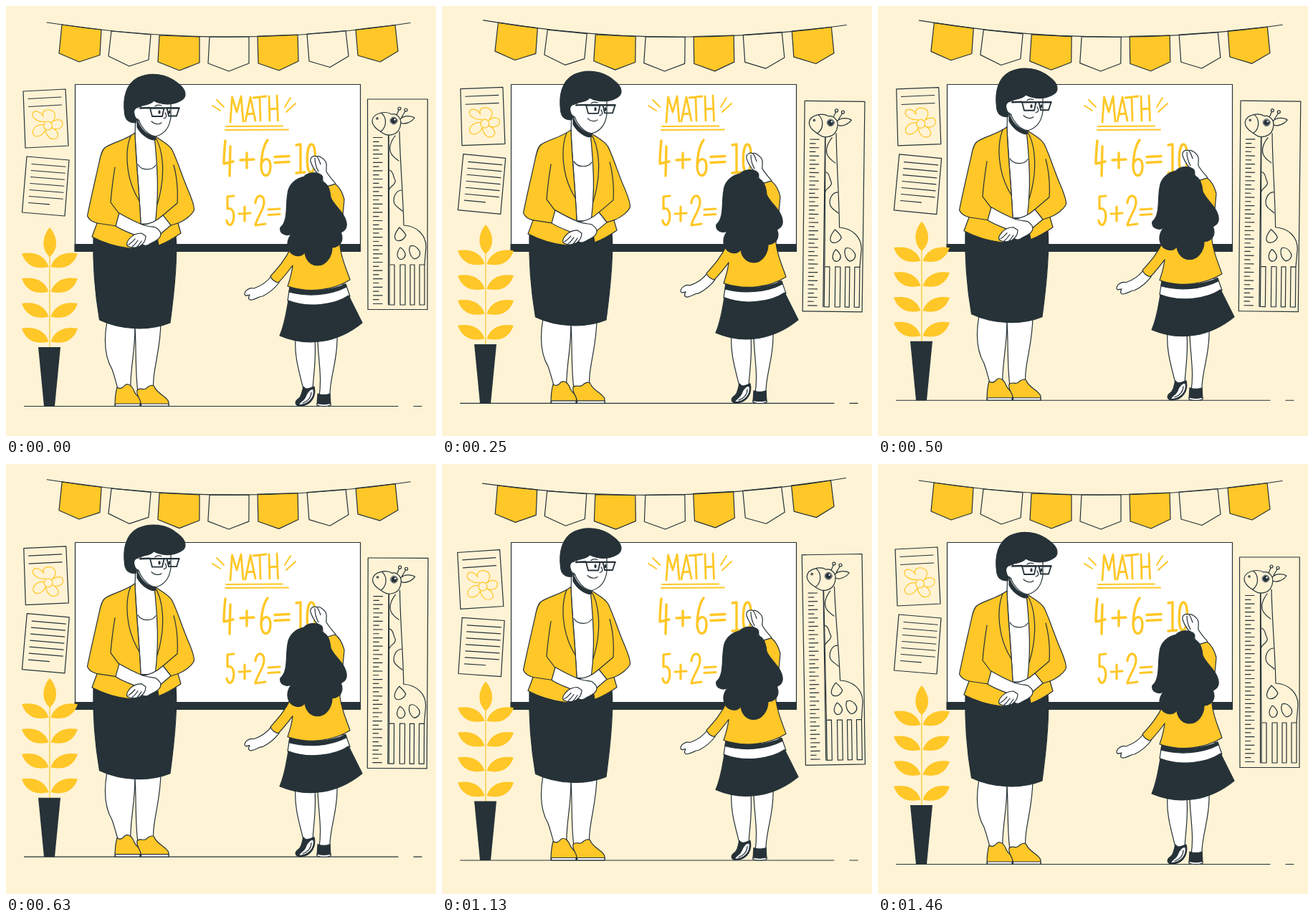
An HTML page that plays this animation: 600 px wide and 600 px high, repeating every 1500 ms.

```html
<!DOCTYPE html>
<html lang="en">
<head>
<meta charset="utf-8">
<title>Math lesson</title>
<style>
html, body { margin: 0; width: 100%; height: 100%; overflow: hidden; background: #fff3d5; }
svg { display: block; width: 100vw; height: 100vh; }
.ink { fill: none; stroke: #263238; stroke-width: 1.2; stroke-linecap: round; stroke-linejoin: round; }
.w { fill: #fff; }
.y { fill: #ffc727; }
.d { fill: #263238; }
.chalk { fill: none; stroke: #ffc727; stroke-linecap: round; stroke-linejoin: round; }
</style>
</head>
<body>
<svg viewBox="0 0 600 600">
  <g class="ink">
    <rect class="w" x="96.5" y="109.5" width="398" height="223"/>
    <rect class="d" x="96" y="332.6" width="398.5" height="9.8"/>
  </g>

  <g class="chalk" role="img" aria-label="MATH 4+6=10 5+2=">
    <path stroke-width="2.8" d="M313 162L315.5 127L322 148L328 126L331 161M334 161L341 127L348 160M336.5 151L346 150M345 128L363 126M354 128L355 160M367 126L368 160M378 125L379.5 160M368 144L378 143"/>
    <path stroke-width="2" d="M294 131L304 141M288 139L299 146M397 128L389 141M404 136L391 148M307 168L386 167.5M306 173L394 172.5"/>
    <path stroke-width="3.4" d="M306 188C305 198 304 210 304 220L317 217M313 196L312 237M327 215L346 214M336 205L336 226M365 187C358 196 356 214 356 225C357 241 369 240 369 224C369 210 358 211 356 222M375 210.5L395 209.5M375 218.5L395 217.5M405 194L411 193L411 232M405 233L417 232M426 193C419 194 418 231 425 232C433 233 434 192 426 193"/>
    <path stroke-width="3.2" d="M318 265L309 266L309 283C320 280 319 298 315 304C312 308 308 303 308 299M325 290L341 289M333 280L333 300M348 275C349 261 361 262 360 275C359 286 350 295 348 306L362 304M366 284L382 283M366 291.5L382 290.5"/>
  </g>

  <g id="bunting" class="ink"></g>

  <g id="wall" class="ink">
    <path d="M24 119L83 116L87 195L27 198ZM31 129.5L77 127M31.5 140.5L77.5 138"/>
    <path class="chalk" d="M54 161C47 163 35 157 37 150C40 144 49 148 52 154C49 146 57 143 64 146C71 149 69 158 63 163C70 157 80 157 79 165C78 172 69 173 64 170C72 173 76 182 69 185C61 188 56 180 55 173C51 181 42 185 38 179C35 172 44 164 53 166"/>
    <circle class="chalk" cx="58.5" cy="167" r="6"/>
    <path d="M29 210L88 215L82 293L22.5 288Z"/>
    <path id="notes"/>
    <path d="M504.5 130H588.3L588 423.5H505ZM533.5 181V417"/>
    <path id="ticks"/>
    <path d="M538 151C530 146 512 149 511 160C511 169 521 174 527 178C533 182 544 180 548 173C551 168 552 160 549 156C546 152 542 150 538 151M524 149.5C531 155 532 168 523 175M550 158C555 152 566 153 570 156C566 162 556 166 551 163M545 152L548 145M552 155L557 147"/>
    <circle cx="549" cy="143" r="2"/><circle cx="558" cy="145" r="2"/>
    <circle cx="518" cy="157" r="1.2"/>
    <circle class="w" cx="541" cy="160" r="5" stroke-width=".8"/>
    <circle class="d" cx="541" cy="160" r="3.6"/>
    <circle cx="542.5" cy="158.5" r="1.2" fill="#fff" stroke="none"/>
    <path d="M534 180L535 360M549 175C550 220 554 262 555 306C573 307 586 319 586 336L584 361"/>
    <path d="M543 181C537 189 534 198 537 205C540 211 544 213 548 216M535 229C541 230 540 239 543 243C545 249 535 252 535 256M552 257C544 257 539 268 542 276C545 281 550 283 553 286"/>
    <path d="M549 309C543 316 540 324 545 327C551 329 556 325 558 320C556 315 552 312 549 309ZM564 335C561 341 564 350 570 353C576 352 579 347 577 342C574 337 569 333 564 335ZM550 337C546 342 544 349 549 353C554 355 558 350 557 345C555 341 553 338 550 337Z"/>
    <path d="M535 417V361H542V417ZM550 417V361H557V417ZM564 417V361H570V417ZM577 417V361H584V417Z"/>
  </g>

  <g id="people" class="ink">
    <path d="M25.5 558.5H547M569 558.5H580"/>

    <g class="y" stroke="none">
      <path d="M61 309C50 322 49 340 61 350C73 340 73 323 61 309Z"/>
      <g id="leaves"></g>
      <path d="M60.4 340H61.6V477H60.4Z"/>
      <path class="d" d="M45 476H76L68 558.5H53Z"/>
    </g>

    <!-- teacher -->
    <path class="w" d="M141 440C136 468 138 490 148 507C152 518 154 528 158 540H174C172 512 180 486 180 448Z"/>
    <path class="w" d="M180 448C182 478 180 510 184 538H206C203 510 216 482 216 440Z"/>
    <path class="y" d="M155 532C159 535 163 533 166 529C171 526 176 530 179 538C181 544 188 546 188 552L187 558H152C152 548 153 539 155 532Z"/>
    <path class="y" d="M183 536C187 532 190 536 195 534C200 529 205 528 207 531C210 541 226 545 227 553V558H188C190 549 181 545 183 536Z"/>
    <path class="w" d="M152.5 555H187V558.4H152.5ZM189 555H227V558.4H188Z"/>
    <path class="d" d="M122 320L188 303H212L237 320C239 345 236 390 229 442C200 454 160 452 130.5 438C124 400 121 360 122 320Z"/>
    <path class="w" d="M180 155C181 166 180 174 180 180C182 220 186 260 188 304H211C212 260 213 220 207 180Z"/>
    <path d="M184 221C189 230 204 230 209 222"/>
    <path class="y" d="M180 177C167 187 150 190 139 197C134 200 132 208 130 218C124 245 118 270 113.5 293C116 299 121 301 127 303L120 322C135 330 155 336 172 338C185 339 189 330 188 303C186 257 181 215 180 177Z"/>
    <path class="y" d="M207 181C217 188 228 193 232 201C241 220 246 239 255 259C260 271 264 282 262 286C258 293 248 300 240 303L244 317C234 324 224 330 213 334L208 305C214 260 211 220 207 181Z"/>
    <path d="M174 181C166 201 166 240 186 272M152 225C149 244 147 260 146 274L158 290L154 307L127 303M207 181C219 198 224 235 211 277M234 222C239 240 240 257 239 275L219 292L230 306L240 303"/>
    <path class="w" d="M158 289C170 296 180 301 190 305C199 305 210 300 219 292L230 306C224 311 219 315 216 318C216 326 205 329 199 333C193 336 188 333 190 328L181 320C171 316 160 312 153 307Z"/>
    <path d="M190 305C198 308 206 308 209 309C213 312 216 315 216 318"/>
    <path class="w" d="M189 317C183 317 176 320 172 325C167 331 168 335 172 336C176 338 183 337 187 335C193 331 195 325 195 321ZM171 333C175 331 177 328 180 325M176 336C180 333 182 330 184 327M182 337C186 333 187 331 189 328"/>

    <path class="d" d="M183 158C186 170 196 181 208 182L209 186C204 189 190 182 183 169Z"/>
    <path class="w" d="M184 133C183 150 184 160 189 167C194 175 201 181 209 182C220 179 228 171 230 155L230 132Z"/>
    <path class="d" d="M181 163C171 163 166 158 165.5 149C163 129 167 109 184 100C201 92 224 94 240 108C252 117 253 127 244 132C232 139 216 138 206 132C203 137 197 137 190 139C186 140 185 150 181 163Z"/>
    <path class="w" d="M187 143C182 139 177 145 179 151C180 157 184 160 187 157Z"/>
    <path class="w" stroke="none" d="M185 141H190V159H185Z"/>
    <path d="M203 161C207 165 213 166 217 163M222 149C225 154 224 156 220 157M208 140C210 138 214 138 217 139"/>
    <path stroke-width="1.8" d="M201 142.5H220.5L218 154H204ZM224.5 142.5H241.5L238 153.5H227Z"/>
    <path stroke-width="2.4" d="M187 142.5L200 142M201 142.4H241.5"/>
    <g class="d" stroke="none"><ellipse cx="214" cy="148" rx="1.6" ry="2.8"/><ellipse cx="228" cy="148" rx="1.5" ry="2.8"/></g>

    <!-- pupil -->
    <path class="w" d="M404 464C402 490 410 513 415 535L428 535C429 513 433 495 431 466Z"/>
    <path class="w" d="M435 466C436 497 441 517 437 545H452C451 520 463 495 462 462Z"/>
    <path class="d" d="M415 531C419 537 424 533 430 531C433 543 427 557 411 558C403 558 402 552 408 548C413 545 413 537 415 531Z"/>
    <path class="w" d="M429 535C431 546 423 556 409 557C408 553 416 551 418 545C420 539 425 533 429 535Z"/>
    <path d="M426 539C426 546 421 552 414 554"/>
    <path class="d" d="M435 541C440 543 447 543 452 541L453 556C448 559 437 559 434 556Z"/>
    <path class="w" d="M434 554.5C439 556 448 556 453 554.5V557C448 559.5 438 559 434 557Z"/>
    <path class="w" d="M396 392L393 411C422 424 460 417 480 405L474 388Z"/>
    <path class="d" d="M396 391C422 400 452 398 474 388L475 392C452 404 420 406 395 399Z"/>
    <path class="d" d="M394 411C422 422 459 417 478 404L497 442C464 469 422 477 382 460C389 444 391 428 394 411Z"/>
    <path class="w" d="M371 376C363 387 355 391 346 394C339 392 333 398 333 402C334 406 337 403 340 403C337 408 339 411 343 410C349 409 353 405 358 405C368 400 375 394 381 386Z"/>
    <path class="y" d="M398 336C390 354 379 366 369 377C371 382 375 385 380 386C387 379 394 370 400 362C399 372 396 382 393 391C423 401 456 397 480 382C475 367 468 353 466 335L472 270C470 262 466 253 459 248L444 251L420 300Z"/>
    <path class="w" d="M441 240C435 235 428 226 425 217C424 211 429 208 434 210C437 208 443 213 446 217C449 223 446 227 447 231C451 238 456 243 460 248C457 249 449 251 445 253Z"/>
    <path d="M431 212C431 218 432 224 436 231M434 210C437 214 438 218 439 221"/>
    <path class="d" d="M393 262C394 250 403 241 416 238C421 232 434 231 440 236C443 239 442 243 440 244C450 248 452 257 453 267C457 277 467 284 472 294C478 306 475 313 467 316C472 326 467 336 455 337C455 350 446 362 435 362C425 362 418 354 417 344C411 352 399 349 395 341C390 331 395 321 400 317C391 323 381 317 383 309C394 300 390 278 393 262Z"/>
  </g>
</svg>
<script>
const $ = id => document.getElementById(id);
const LOOP = 1500, FRAMES = 36;

// Bunting: top left, top right, right, tip and left corner of each flag
const flags = [
  [78, 26, 133, 33, 131, 68.5, 102, 78, 74, 66],
  [147, 35, 202, 40, 199, 75, 172, 84, 143, 70],
  [214, 41, 270, 43, 270, 79, 242, 90, 212, 78],
  [284, 43, 339, 43, 339, 80, 311, 91, 282, 80],
  [351, 42, 407, 40, 408, 77, 381, 90, 352, 80],
  [420, 39, 474, 34.5, 478, 70, 452, 85.5, 423, 77],
  [488, 33, 543, 26.5, 547, 63, 522, 78, 491, 69]
];
$('bunting').innerHTML = flags.map((p, i) =>
  `<polygon points="${p}"${i % 2 ? '' : ' class="y"'}/>`
).join('') + '<path d="M57 23Q310.5 63 564 23.5"/>';

let notes = '', ticks = '';
for (let i = 0; i < 7; i++) {
  const x = 36 - i * 0.75, y = 220.5 + i * 9, w = i === 6 ? 29 : 47;
  notes += `M${x} ${y}l${w} ${w * 0.08}`;
}
for (let i = 0; i < 41; i++) {
  ticks += `M512.5 ${183.5 + i * 5.8}h${i % 2 ? 7.5 : 12.5}`;
}
$('notes').setAttribute('d', notes);
$('ticks').setAttribute('d', ticks);

const leaf = 'M22 345.5C40 342 55 349 59.5 364C42 368 28 363 22 345.5Z';
$('leaves').innerHTML = [0, 1, 2, 3].map(i =>
  `<g transform="translate(0 ${i * 34.8})"><path d="${leaf}"/>` +
  `<path transform="matrix(-1 0 0 1 122 0)" d="${leaf}"/></g>`
).join('');

function draw(ms) {
  const step = Math.floor((ms % LOOP + 4) * FRAMES / LOOP) % FRAMES;
  const p = step / (FRAMES - 1);
  const lift = -24 * Math.min(p, 1 - p);
  const tilt = p < 0.25 ? 4 * p : p < 0.75 ? 2 - 4 * p : 4 * p - 4;
  $('people').setAttribute('transform', `translate(0 ${lift})`);
  $('bunting').setAttribute('transform', `rotate(${tilt} 311 57)`);
  $('wall').setAttribute('transform', `rotate(${tilt} 305.5 270)`);
}

const start = performance.now();
function tick(now) {
  draw(Math.max(0, now - start));
  requestAnimationFrame(tick);
}
draw(0);
requestAnimationFrame(tick);
</script>
</body>
</html>
```
